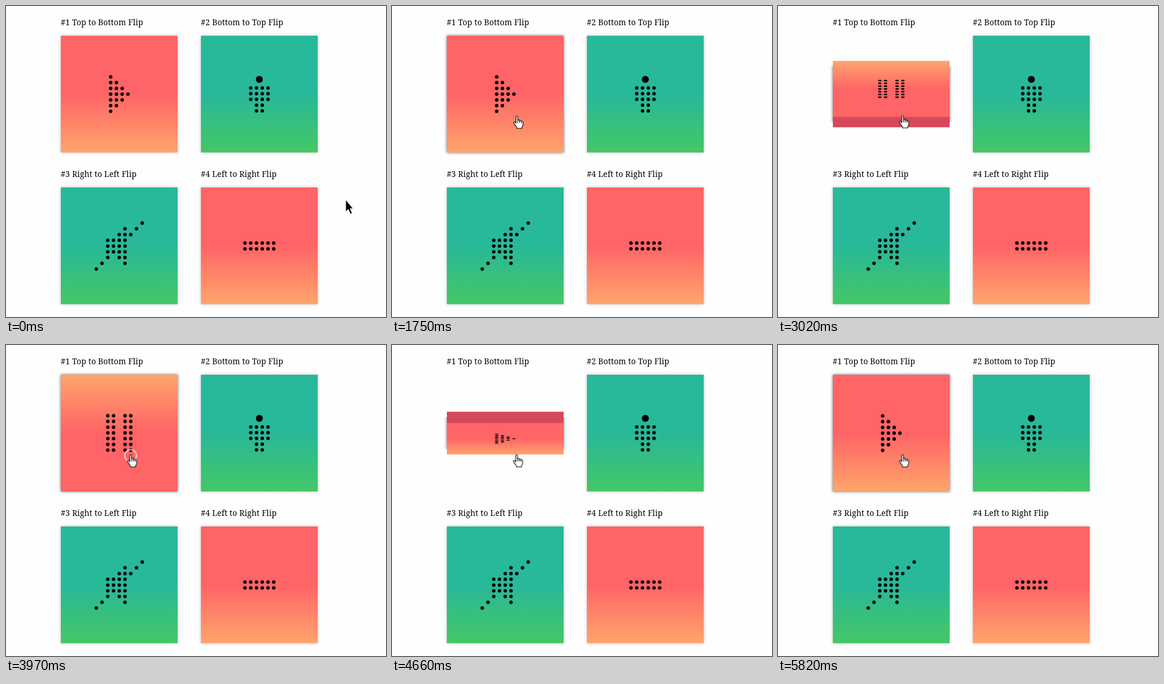
An HTML page for the animation above (6.34 s loop, 651 by 533 pixels).

```html
<!DOCTYPE html>
<html lang="en">
<head>
<meta charset="utf-8">
<title>Flip cards</title>
<style>
  html, body { margin: 0; width: 100%; height: 100%; overflow: hidden; background: #fefefe; }
  #stage { position: relative; width: 651px; height: 533px; overflow: hidden; }
  .label {
    position: absolute; left: 0; top: -33px; white-space: nowrap;
    font: 13.5px/20px "Noto Serif", serif; letter-spacing: .2px; color: #000;
  }
  .card { position: absolute; width: 200px; height: 200px; }
  .shadow, .box, .face { position: absolute; inset: 0; }
  .shadow { box-shadow: 0 0 5px rgba(0, 0, 0, .28); background: #d5495b; }
  .box { transform-style: preserve-3d; }
  .face { backface-visibility: hidden; }
  .face svg { position: absolute; left: 0; top: 0; }
  .front { transform: translateZ(10px); }
  .back { transform: rotateX(180deg) translateZ(10px); }
  .side {
    position: absolute; left: 0; top: 90px; width: 200px; height: 20px;
    background: #d5495b; transform: rotateX(90deg) translateZ(100px);
  }
  .red { background: linear-gradient(#ff6466 50%, #ffa56c); }
  .red.back { background: linear-gradient(to top, #ff6466 50%, #ffa56c); }
  .green { background: linear-gradient(#28b89a 50%, #45c765); }
  #pointer, #ring { position: absolute; left: 0; top: 0; overflow: visible; }
  #pointer g { opacity: 0; }
</style>
</head>
<body>
<div id="stage"></div>
<script>
const LOOP = 6340;
const STEP = 9.85;
const stage = document.getElementById('stage');

const PLAY = ['o', 'oo', 'ooo', 'oooo', 'ooo', 'oo', 'o'];
const PAUSE = Array(7).fill('oo oo');
const PERSON = ['oooo', 'oooo', 'oooo', ' oo', ' oo'];
const PLANE = ['        o', '     o o', '    ooo', '  oooo', '  oooo', '  oooo', '  o oo', ' o   o', 'o'];
const BAR = ['oooooo', 'oooooo'];

const circle = (x, y, r) => `<circle cx="${x}" cy="${y}" r="${r}"/>`;

function dots(rows, x, y, extra = '') {
  const marks = rows.map((row, j) => [...row].map((c, i) =>
    c === 'o' ? circle(x + i * STEP, y + j * STEP, 3) : '').join('')).join('');
  return `<svg width="200" height="200">${marks}${extra}</svg>`;
}

const face = (kind, art) => `<div class="face ${kind}">${art}</div>`;

function addCard(x, y, text, faces) {
  const card = document.createElement('div');
  card.className = 'card';
  card.style.cssText = `left:${x}px;top:${y}px`;
  card.innerHTML = `<div class="label">${text}</div><div class="shadow"></div><div class="box">${faces}</div>`;
  stage.append(card);
  return { box: card.querySelector('.box'), shadow: card.querySelector('.shadow') };
}

const first = addCard(94, 51, '#1 Top to Bottom Flip',
  face('red front', dots(PLAY, 85.3, 70.5)) +
  face('red back', dots(PAUSE, 80.4, 70.2)) +
  '<div class="side"></div>');
addCard(334, 51, '#2 Bottom to Top Flip',
  face('green front', dots(PERSON, 85.3, 89.4, circle(100, 74.8, 6))));
addCard(94, 311, '#3 Right to Left Flip',
  face('green front', dots(PLANE, 60.6, 61)));
const last = addCard(334, 311, '#4 Left to Right Flip',
  face('red front', dots(BAR, 75.4, 95.3)));

stage.insertAdjacentHTML('beforeend', `
  <svg id="ring" width="1" height="1">
    <circle r="10" fill="none" stroke="#fff" stroke-width="1.4" opacity="0"/>
  </svg>
  <svg id="pointer" width="1" height="1">
    <g id="arrow"><path d="M0 -1V19.5L4.4 15.4L8 23.5L11 22L7.5 14.2H12.5Z"
      fill="#000" stroke="#fff" stroke-width=".8"/></g>
    <g id="beam"><path d="M-3.5 -8.5H-1L0 -7.5L1 -8.5H3.5M0 -7.5V7.5M-3.5 8.5H-1L0 7.5L1 8.5H3.5"
      fill="none" stroke="#000" stroke-width="1.6"/></g>
    <g id="hand"><path d="M-1.5 2Q-1.5 .5 0 .5T1.5 2V8Q1.7 6.6 3 6.8Q4.4 6.9 4.5 8.5
      Q5 7.4 6.2 7.7Q7.5 8 7.5 9.5Q8.2 8.7 9.3 9.2Q10.4 9.7 10.4 11V15Q10.4 17 8.5 19.5V21.5H-.2V19.5
      Q-2.5 17 -5.2 12.6Q-6 11.2 -5 10.5Q-3.8 9.8 -2.5 11.4L-1.5 12.5Z
      M1.5 8V12M4.5 8.5V12M7.5 9.5V12.5" fill="#fff" stroke="#000" stroke-width="1.1"/></g>
  </svg>`);

// Rows are [ms, properties, easing towards the next row].
function play(el, rows) {
  const frames = rows.map(([ms, props, easing = 'linear']) => ({ offset: ms / LOOP, easing, ...props }));
  el.animate(frames, { duration: LOOP, iterations: Infinity });
}

// Switches between two states: `on` holds during each [from, to] span.
function toggle(el, off, on, spans) {
  const hold = 'step-end';
  const rows = [[0, off, hold]];
  for (const [from, to] of spans) {
    if (from === 0) rows.length = 0;
    rows.push([from, on, hold]);
    if (to < LOOP) rows.push([to, off, hold]);
  }
  rows.push([LOOP, rows[rows.length - 1][1]]);
  play(el, rows);
}

// The second click interrupts an 1800 ms "ease" just before it ends.
const CUT_EASE = 'cubic-bezier(.256, .098, .261, .966)';
const turn = deg => ({ transform: `rotateX(${-deg}deg)` });
const flip = [
  [0, turn(0)], [2330, turn(0), CUT_EASE],
  [4050, turn(179.8), 'ease'], [5850, turn(0)], [LOOP, turn(0)]
];
play(first.box, flip);
play(first.shadow, flip);

const at = (x, y) => ({ transform: `translate(${x}px, ${y}px)` });
play(document.getElementById('pointer'), [
  [0, at(582, 333)],
  [750, at(582, 333), 'cubic-bezier(.4, .1, .7, .64)'],
  [1100, at(411, 285), 'cubic-bezier(.3, .35, .6, .75)'],
  [1380, at(239, 225), 'cubic-bezier(.1, .5, .4, 1)'],
  [1840, at(213.5, 187.5)],
  [LOOP, at(213.5, 187.5)]
]);

const shape = (id, spans) =>
  toggle(document.getElementById(id), { opacity: 0 }, { opacity: 1 }, spans);
shape('arrow', [[0, 872], [932, 1015], [1128, 1275]]);
shape('beam', [[1015, 1128]]);
shape('hand', [[872, 932], [1275, LOOP]]);

const glow = a => ({ boxShadow: `0 0 5px rgba(0, 0, 0, ${a})` });
toggle(last.shadow, glow(.28), glow(.6), [[872, 1147]]);
toggle(first.shadow, glow(.28), glow(.6), [[1275, LOOP]]);

const ripple = (scale, opacity) => ({ transform: `translate(213.5px, 189.5px) scale(${scale})`, opacity });
const clicks = [2180, 3900].flatMap(ms => [
  [ms, ripple(.4, 0)], [ms + 1, ripple(.4, 1)], [ms + 70, ripple(1, 1)],
  [ms + 149, ripple(1.5, .6)], [ms + 150, ripple(1.5, 0)]
]);
play(document.querySelector('#ring circle'), [[0, ripple(.4, 0)], ...clicks, [LOOP, ripple(.4, 0)]]);
</script>
</body>
</html>
```
